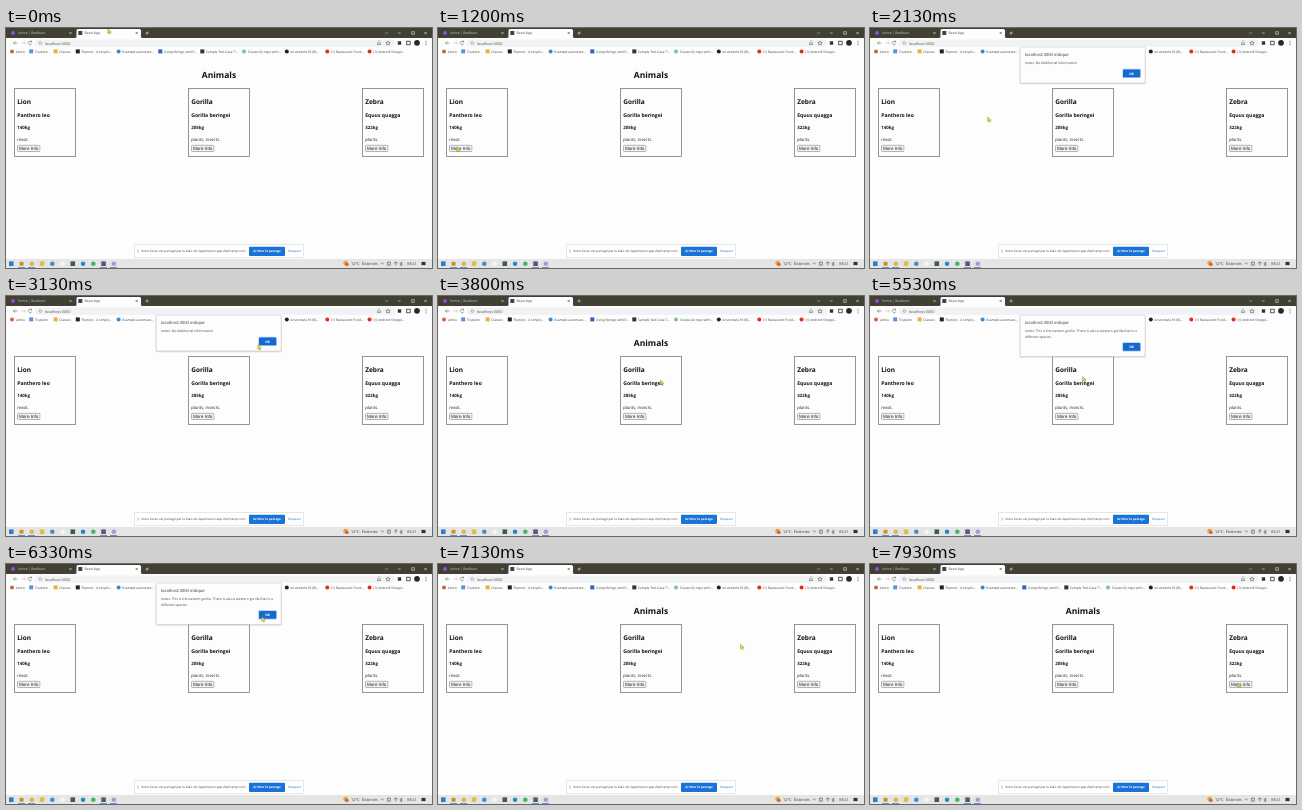
Write an HTML page that moves like this. It is 426 px wide and 240 px high and loops after 8000 ms.

```html
<!DOCTYPE html>
<html lang="fr">
<head>
<meta charset="utf-8">
<title>Animals</title>
<style>
html, body { margin: 0; width: 100%; height: 100%; overflow: hidden; background: #fdfdfd; }
svg { display: block; width: 100vw; height: 100vh; font-family: "Open Sans", "Noto Sans", sans-serif; text-rendering: geometricPrecision; }
.arial { font-family: "Liberation Sans", sans-serif; }
</style>
</head>
<body>
<svg id="stage" viewBox="0 0 426 240"></svg>
<script>
const rect = (x, y, w, h, fill, extra = '') =>
  `<rect x="${x}" y="${y}" width="${w}" height="${h}" fill="${fill}" ${extra}/>`;
const dot = (x, y, r, fill) => `<circle cx="${x}" cy="${y}" r="${r}" fill="${fill}"/>`;
const square = (x, y, r, fill) => rect(x - r, y - r, 2 * r, 2 * r, fill);
const line = (d, color = '#666', width = .6) =>
  `<path d="${d}" fill="none" stroke="${color}" stroke-width="${width}"/>`;
const text = (x, y, size, value, fill = '#222', extra = '') =>
  `<text x="${x}" y="${y}" font-size="${size}" fill="${fill}" ${extra}>${value}</text>`;
const bold = 'font-weight="700"';
const centered = 'text-anchor="middle"';
const cross = (x, y, color) => line(`M${x - 1} ${y - 1}l2 2m0 -2l-2 2`, color);

function titleBar() {
  return rect(0, 0, 426, 10, '#414032') +
    `<path d="M69 10q1.5 0 1.5 -1.5v-6q0 -1.5 1.5 -1.5h61.5q1.5 0 1.5 1.5v6q0 1.5 1.5 1.5z" fill="#fdfdfd"/>` +
    dot(7, 5, 2, '#8951dc') + text(12, 6.3, 3.4, 'Home | Reelbarn', '#d5d0e2') + cross(64.5, 5, '#ddd') +
    square(74.3, 5, 2, '#2c4a5c') + text(78.5, 6.3, 3.4, 'React App', '#444') + cross(130.7, 5, '#444') +
    line('M139.6 5h3m-1.5 -1.5v3', '#eee') +
    line('M379.5 4.4l1.2 1.2 1.2 -1.2M392 5h2.6m11.1 -1.3h2.6v2.6h-2.6z', '#ddd') + cross(419.5, 5, '#eee');
}

function toolbar() {
  return rect(0, 10, 426, 17.5, '#fdfdfd') +
    rect(29, 11.5, 360, 7.2, '#f1f2f3', 'rx="3.6"') +
    line('M11.5 15h-4l1.6 -1.6m-1.6 1.6l1.6 1.6') +
    line('M15.5 15h4l-1.6 -1.6m1.6 1.6l-1.6 1.6', '#bbb') +
    line('M25.5 13.8a1.8 1.8 0 1 0 .3 1.8m-.2 -3v1.4h-1.4') +
    line('M33 15.1a1.3 1.3 0 1 0 2.6 0a1.3 1.3 0 1 0 -2.6 0', '#777', .5) +
    text(39, 16.5, 3.75, 'localhost:3000', '#555') +
    line('M371.5 14.5v2h3v-2m-1.5 1v-3') +
    line('M382 12.9l.7 1.5 1.6 .1 -1.2 1 .4 1.6 -1.5 -.9 -1.4 .9 .4 -1.6 -1.2 -1 1.6 -.1z') +
    square(393.5, 15, 1.7, '#333') + rect(400.7, 13.2, 3.4, 3.6, 'none', 'stroke="#333" stroke-width=".8"') +
    dot(411, 14.8, 2.9, '#292929') +
    [13.3, 15, 16.7].map(y => dot(420, y, .5, '#555')).join('');
}

function bookmarks() {
  const items = [
    [4, dot, '#dc5a4c', 'Lettra'], [23.2, square, '#5a91e7', 'Traduire'], [47.6, square, '#e1b445', 'Classes'],
    [69.8, square, '#222', 'Planner - A simple…'], [110.6, dot, '#2f8ed8', 'Example automate…'],
    [152.3, square, '#2f5fc0', 'Using Mongo with E…'], [194.3, square, '#333', 'Sample Test Case T…'],
    [236, dot, '#7dbfa0', 'Create Git repo with…'], [278.8, dot, '#222', 'lorvendale 36 (B)…'],
    [319.3, dot, '#eb2824', '(1) Restaurant Food…'], [361.6, dot, '#eb2824', '(1) Android Shoppi…']
  ];
  return items.map(([x, icon, color, label]) =>
    icon(x + 2, 23.4, 2, color) + text(x + 5.7, 24.7, 3.3, label, '#444')).join('');
}

function card(x, name, species, weight, food) {
  const left = x + 2.7;
  return rect(x, 60.5, 61, 68, 'none', 'stroke="#8c8c86" stroke-width=".9"') +
    text(left, 76.4, 6.5, name, '#111', bold) +
    text(left, 89.2, 5.1, species, '#111', bold) +
    text(left, 101.4, 4.4, weight, '#111', bold) +
    text(left, 113.1, 4.25, food) +
    rect(left + .3, 117.3, 22.4, 6.2, '#f3f3f5', 'rx=".8" stroke="#85859a" stroke-width=".6"') +
    text(left + 11.5, 122, 4.6, 'More Info', '#222', `${centered} class="arial"`);
}

function shareBar() {
  return rect(128.5, 216.5, 169, 13, '#fff', 'stroke="#ddd" stroke-width=".7"') +
    line('M131.8 221.4v3.6m1 -2.7v1.8', '#888', .4) +
    text(135.3, 224.3, 3.18, "Votre écran est partagé par le biais de l'application app.clipchamp.com.", '#444') +
    rect(243, 218.7, 36, 9.2, '#1a73d8', 'rx="1"') +
    text(261, 224.4, 3.1, 'Arrêter le partage', '#fff', `${bold} ${centered}`) +
    text(282, 224.3, 3.2, 'Masquer', '#3679cb');
}

function taskbar() {
  const colors = ['#287fd1', '#df8a34', '#d9b94a', '#e6bb44', '#3f8fd6', '#f6f6f6', '#3b5c48', '#2a87cc', '#42b76c', '#5d5574', '#a99bd0'];
  const icons = colors.map((color, i) => (i % 3 ? dot : square)(5.3 + i * 10.25, 235.7, 2.3, color)).join('');
  return rect(0, 231, 426, 9, '#e5e5e3') + icons +
    [12, 22, 94, 104].map(x => rect(x, 239.2, 7, .8, '#4285c4')).join('') +
    dot(339.7, 235.2, 2.4, '#e6a238') + dot(341, 236.4, 1.6, '#c9604c') +
    text(345, 237, 3.9, '12°C', '#333') + text(355.7, 237, 3.75, 'Éclaircies', '#333') +
    line('M375 236.2l1.4 -1.4 1.4 1.4m3.8 -2.2h2.7v3.2h-2.7zM388.3 235.3l1.5 -1.5 1.5 1.5m-1.5 -1.5v3.5M394.3 236.8v-1.6l1.5 -1v3.6z', '#444') +
    text(401, 237, 3.75, '09:21', '#333') +
    rect(415.5, 233.9, 4, 3.2, '#333');
}

function dialog(id, height, lines) {
  const buttonY = 19 + height - 13.5;
  return `<g id="${id}">` +
    rect(149.6, 19.4, 126.2, height + .8, '#777', 'rx="1.5" opacity=".25"') +
    rect(150.2, 19, 125, height, '#fdfdfd', 'rx="1.2" stroke="#c6c6c6" stroke-width=".5"') +
    text(155, 28.4, 4.15, 'localhost:3000 indique', '#333') +
    lines.map((value, i) => text(155, 35.9 + i * 5.6, 3.4, value, '#444')).join('') +
    rect(252.3, buttonY - .7, 18.6, 9.2, '#a9cdf7', 'rx="1.3"') +
    rect(253, buttonY, 17.2, 7.8, '#1769cf', 'rx=".9"') +
    text(261.6, buttonY + 5.1, 3.3, 'OK', '#fff', `${bold} ${centered}`) + '</g>';
}

document.getElementById('stage').innerHTML =
  rect(0, 0, 426, 240, '#fdfdfd') + titleBar() + toolbar() + bookmarks() +
  text(213, 50, 8.5, 'Animals', '#111', `${bold} ${centered}`) +
  card(8.5, 'Lion', 'Panthero leo', '140kg', 'meat.') +
  card(182.5, 'Gorilla', 'Gorilla beringei', '205kg', 'plants, insects.') +
  card(356.5, 'Zebra', 'Equus quagga', '322kg', 'plants.') +
  shareBar() + taskbar() +
  dialog('lionNote', 36, ['notes: No Additional information']) +
  dialog('gorillaNote', 41.5, [
    'notes: This is the eastern gorilla. There is also a western gorilla that is a',
    'different species.'
  ]) +
  '<path id="cursor" d="M-1.2 -2.2v4.6l1.1 -1 .8 1.7 .9 -.4 -.8 -1.7h1.6z" fill="#f0e630" stroke="#77752a" stroke-width=".4"/>';

// Time in ms, followed by pointer position.
const path = [
  [0, 103, 3], [200, 103, 3], [1050, 20, 121], [1550, 20, 121],
  [2700, 253, 51], [3350, 253, 51], [4200, 199, 116], [4850, 199, 116],
  [5530, 214, 82], [6250, 257, 55], [6600, 257, 55], [7650, 369, 121], [8000, 369, 121]
];
const cursor = document.getElementById('cursor');
const show = (id, visible) =>
  document.getElementById(id).setAttribute('visibility', visible ? 'visible' : 'hidden');

function draw(now) {
  const frameTime = 1000 / 15;
  const time = Math.floor((now % 8000) / frameTime) * frameTime;
  const next = path.findIndex(point => point[0] > time);
  const [t0, x0, y0] = path[next - 1];
  const [t1, x1, y1] = path[next];
  const progress = (time - t0) / (t1 - t0);
  const ease = progress * progress * (3 - 2 * progress);
  cursor.setAttribute('transform', `translate(${x0 + (x1 - x0) * ease} ${y0 + (y1 - y0) * ease})`);
  show('lionNote', time >= 1530 && time < 3330);
  show('gorillaNote', time >= 4800 && time < 6530);
  requestAnimationFrame(draw);
}
draw(performance.now());
</script>
</body>
</html>
```
